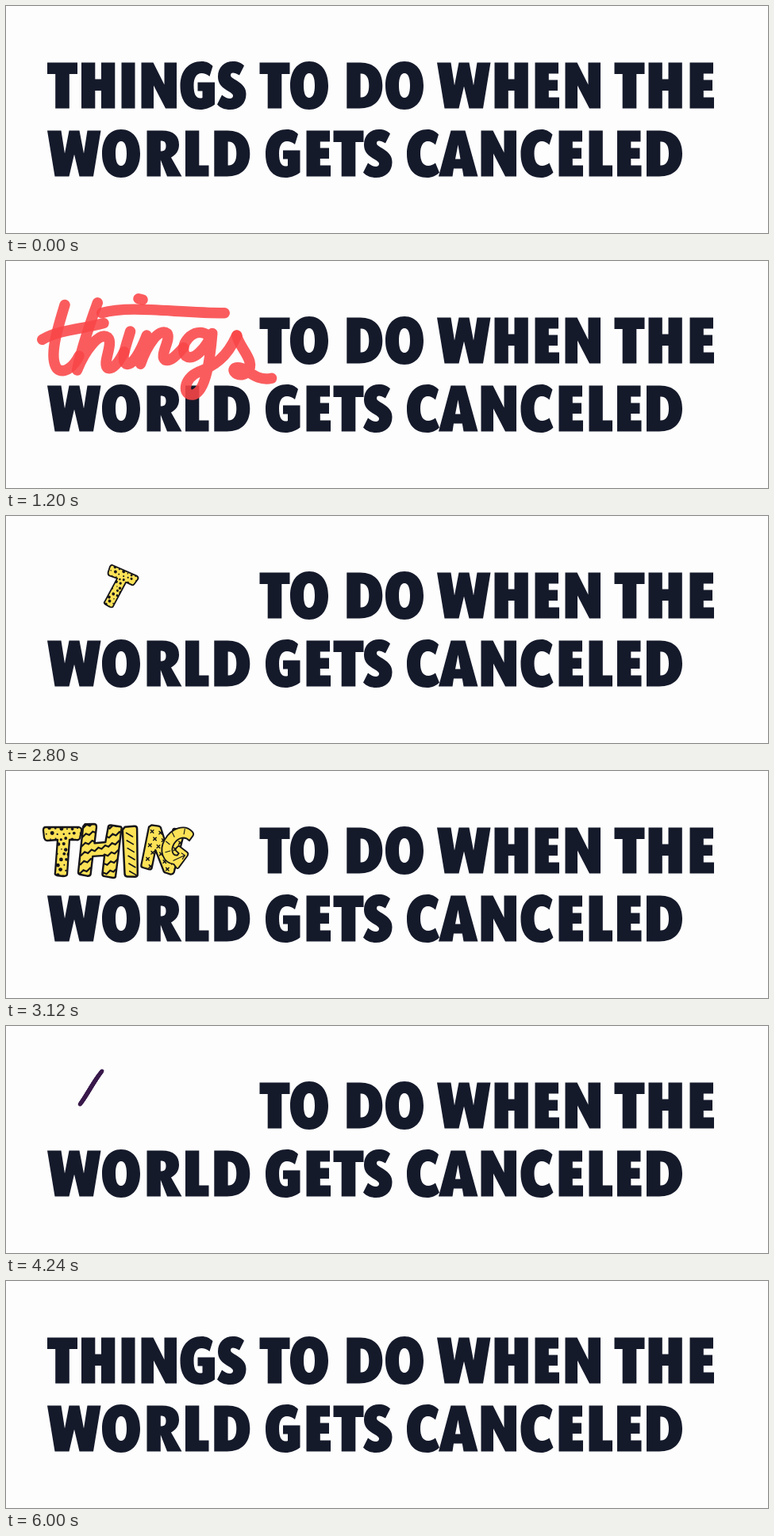
Animation, 960 px wide and 287 px high, one loop 6.8 s. Source, as an HTML page with a canvas:

```html
<!DOCTYPE html>
<html lang="en">
<head>
<meta charset="utf-8">
<title>Things to do when the world gets canceled</title>
<style>
html, body { margin: 0; width: 100%; height: 100%; overflow: hidden; background: #fdfdfd; }
canvas { display: block; width: 960px; height: 287px; }
</style>
</head>
<body>
<canvas id="stage" width="960" height="287" role="img" aria-label="Things to do when the world gets canceled">Things to do when the world gets canceled</canvas>
<script>
const ctx = document.getElementById('stage').getContext('2d');
const LOOP = 6800, STEP = 80;
const INK = '#151a2b', PURPLE = '#3a1a4c', RED = '#fa4648', YELLOW = '#fce256', BLACK = '#15151b';

// Heavy capitals, 58 units tall
const GLYPHS = {
  T: 'M0 0H38V14.5H27.8V58H10.2V14.5H0Z',
  H: 'M0 0H17.3V21H25V0H42.3V58H25V35.5H17.3V58H0Z',
  I: 'M0 0H17V58H0Z',
  N: 'M0 0H15L29 28V0H44.5V58H30.5L15.5 29V58H0Z',
  E: 'M0 0H29.5V14H17.3V22H28.5V35.5H17.3V44H30.5V58H0Z',
  L: 'M0 0H17.3V44H29.5V58H0Z',
  D: 'M0 0H17C35 0 45 11 45 29S35 58 16 58H0ZM17.3 14V44C24.5 44.5 28 39 28 29S24.5 13.5 17.3 14Z',
  O: 'M24 -1.5C39 -1.5 48 11 48 29S39 59.5 24 59.5S0 47 0 29S9 -1.5 24 -1.5ZM24 13.5C19 13.5 17 20 17 29S19 44.5 24 44.5S31 38 31 29S29 13.5 24 13.5Z',
  W: 'M0 0H17.5L22 29L27.5 0H40.5L46 29L50.5 0H67.5L58 58H40.5L34 30L27.5 58H9.5Z',
  R: 'M0 0H19C34 0 40.5 7 40.5 18C40.5 26 36 31 30.5 34L44 58H25.5L17.3 37V58H0ZM17.3 13V26H18C22 26 24 24 24 19.5S22 13 18 13Z',
  G: 'M41 4.5L37 17.5C34 15 30 13.5 27 13.5C20 13.5 17 20 17 29C17 40 20 45 25 45Q27 45 28 44.5V36H22V25H43.5V53C38 57 32 59.5 25 59.5C9 59.5 0 48 0 29.5C0 11 10 -1.5 27 -1.5C33 -1.5 37 .5 41 4.5Z',
  S: 'M34 4L28 16C24.5 14 22 13 20 13C18 13 17 14 17 16C17 18 19 19.5 25 23C33 28 36.5 33 36.5 40C36.5 52 28 59.5 16 59.5C10 59.5 4 57.5 0 53L6 41C10 44 13 45.5 16 45.5C18.5 45.5 20 44 20 42C20 39.5 17 38 12 35C4 30 1 25 1 17.5C1 6 9 -1.5 20 -1.5C26 -1.5 31 .5 34 4Z',
  C: 'M40 5L36 18C33 15 30 13.5 26.5 13.5C20 13.5 17 20 17 29S20 44.5 27 44.5C30 44.5 33 43 36 41L41 53C37 57 32 59.5 25.5 59.5C9 59.5 0 48 0 29.5S10 -1.5 26 -1.5C32 -1.5 36 1 40 5Z',
  A: 'M15.5 0H33.5L49.5 58H31.5L29.8 48H19L17.5 58H0ZM24.5 18L21 36H27.5Z'
};

const ROW1 = 71.5, ROW2 = 157.5;
const WORDS = [
  ['TO', ROW1, [319.5, 358]],
  ['DO', ROW1, [429.3, 478]],
  ['WHEN', ROW1, [543, 615.5, 666.5, 704.5]],
  ['THE', ROW1, [766.5, 809.5, 861.5]],
  ['WORLD', ROW2, [52, 121, 177.5, 226, 262.3]],
  ['GETS', ROW2, [327, 378.5, 412.5, 450]],
  ['CANCELED', ROW2, [505, 545, 598.5, 648.5, 696.5, 734.5, 770, 807]]
];
const FIRST = ['THINGS', ROW1, [52, 95, 145.5, 170.5, 219.5, 266]];
const shapes = {};
for (const k in GLYPHS) shapes[k] = new Path2D(GLYPHS[k]);

function drawWord([text, y, xs]) {
  ctx.fillStyle = INK;
  xs.forEach((x, i) => {
    ctx.save();
    ctx.translate(x, y);
    ctx.fill(shapes[text[i]], 'evenodd');
    ctx.restore();
  });
}

function rng(seed) {
  return () => {
    seed = (seed * 16807) % 2147483647;
    return seed / 2147483647;
  };
}

function sample(d, gap) {
  const p = document.createElementNS('http://www.w3.org/2000/svg', 'path');
  p.setAttribute('d', d);
  const len = p.getTotalLength(), n = Math.max(2, Math.ceil(len / gap)), pts = [];
  for (let i = 0; i <= n; i++) pts.push(p.getPointAtLength(len * i / n));
  return pts;
}

// Stroke a sampled path up to a fraction, with a width per segment
function pen(pts, part, width) {
  const end = Math.floor((pts.length - 1) * Math.min(1, part));
  ctx.lineCap = 'round';
  for (let i = 1; i <= end; i++) {
    const a = pts[i - 1], b = pts[i];
    ctx.lineWidth = width(b.x - a.x, b.y - a.y);
    ctx.beginPath();
    ctx.moveTo(a.x, a.y);
    ctx.lineTo(b.x, b.y);
    ctx.stroke();
  }
}

// Red marker lettering
const MARKER = [
  'M148 84C145 94 140 109 144 115C148 119 153 113 155 109',
  'M137 101C146 96 156 96 167 93',
  'M164 83C160 94 156 106 154 116C158 106 165 97 169 100C172 103 166 113 169 115C172 116 175 111 177 107',
  'M180 97C178 104 175 111 178 113C181 114 185 107 188 99L185 113C188 104 194 95 198 98C200 101 194 109 197 111C200 112 203 108 206 105',
  'M218 99C211 94 203 104 207 109C211 112 217 105 220 98C219 110 217 126 211 128C205 129 206 120 213 117C221 114 227 110 232 99',
  'M232 99C233 105 242 112 237 117C234 120 229 117 231 115C236 113 240 122 249 120',
  'M166 88C180 84 202 88 226 88',
  'M184 81L186 81.5'
].map(d => new Path2D(d));
const MARKER_SCALE = [1, 2.2, 2.79, 2.58, 2.66];

function drawMarker(t) {
  const k = MARKER_SCALE[Math.min(4, Math.floor((t - 960) / STEP))];
  ctx.save();
  ctx.translate(193 - (k - 1) * 1.8, 104.5 + (k - 1) * 2.4);
  ctx.scale(k, k);
  ctx.translate(-193, -104.5);
  ctx.globalAlpha = 0.88;
  ctx.strokeStyle = RED;
  ctx.lineCap = ctx.lineJoin = 'round';
  ctx.lineWidth = 5.2;
  MARKER.forEach(p => ctx.stroke(p));
  ctx.restore();
}

// Rough dry-pen letters, one per step
const ROUGH = [
  ['M40 66C50 62 62 65 76 68C84 69 92 68 96 65', 'M69 68C67 86 69 104 68 119'],
  ['M114 39C111 66 114 94 112 119', 'M113 97C122 84 143 81 144 96C145 104 144 112 144 119'],
  ['M170 87C168 98 170 109 169 119', 'M170 67L172 68'],
  ['M191 87C189 98 191 109 190 119', 'M191 97C200 84 220 81 221 96C222 104 221 112 221 119'],
  ['M264 89C250 82 235 91 235 104C235 121 252 124 264 108', 'M265 87C263 106 268 134 260 146C254 154 243 153 236 146'],
  ['M311 89C301 83 288 86 288 94C289 103 311 103 312 112C311 122 296 121 287 117']
].map(set => set.map(d => sample(d, 1.6)));

function drawRough(t) {
  const count = Math.floor((t - 1840) / STEP) + 1;
  ctx.strokeStyle = PURPLE;
  ROUGH.slice(0, count).forEach((set, i) => set.forEach((pts, j) => {
    const rand = rng(31 + i * 17 + j * 5);
    const rough = pts.map(p => ({ x: p.x + rand() * 1.4 - 0.7, y: p.y + rand() * 1.4 - 0.7 }));
    pen(rough, 1, (dx, dy) => 3.4 + 2 * Math.abs(dy) / (Math.hypot(dx, dy) || 1) + rand() * 1.3);
  }));
}

// Yellow cut-out letters: centre, outline, pattern
const line = (x1, y1, x2, y2) => {
  ctx.moveTo(x1, y1);
  ctx.lineTo(x2, y2);
};

function dots() {
  const rand = rng(77);
  for (let y = 73, row = 0; y < 134; y += 6.5, row++) {
    for (let x = 48 + row % 2 * 3.5; x < 98; x += 7) {
      ctx.beginPath();
      ctx.arc(x + rand() * 2 - 1, y + rand() * 2 - 1, 0.8 + rand() * 1.7, 0, 7);
      ctx.fill();
    }
  }
}

function waves() {
  ctx.lineWidth = 2.1;
  for (let y = 74; y < 160; y += 11) {
    ctx.beginPath();
    for (let x = 97, i = 0; x < 152; x += 4, i++) ctx.lineTo(x, y + (i % 2 ? 1.5 : -1.5) - (x - 97) * 0.4);
    ctx.stroke();
  }
}

function dashes() {
  ctx.lineWidth = 1.5;
  ctx.beginPath();
  for (let y = 80; y < 128; y += 9) line(157, y - 2, 164, y + 3);
  ctx.stroke();
}

function crosses() {
  ctx.lineWidth = 1.5;
  ctx.beginPath();
  for (let y = 81, row = 0; y < 132; y += 9, row++) {
    for (let x = 181 + row % 2 * 5; x < 222; x += 11) {
      line(x - 2, y - 1.6, x + 2, y + 1.6);
      line(x + 1.6, y - 2, x - 1.6, y + 2);
    }
  }
  ctx.stroke();
}

function slants() {
  ctx.lineWidth = 1.4;
  ctx.beginPath();
  line(230, 93, 236, 98);
  line(227, 110, 234, 112);
  line(233, 126, 239, 121);
  line(250, 133, 263, 118);
  line(257, 117, 263, 118);
  line(263, 118, 262, 125);
  line(246, 80, 248, 88);
  ctx.stroke();
}

function rings() {
  ctx.lineWidth = 1.8;
  for (const [x, y, r] of [[291, 96, 6], [291, 96, 13], [291, 96, 20], [274, 130, 8]]) {
    ctx.beginPath();
    ctx.arc(x, y, r, 0, 7);
    ctx.stroke();
  }
}

const CUTOUTS = [
  [71, 101, 'M50 71L92 71Q96 72 95 76L93 85Q92 88 88 87L80 87L77 131Q76 133 72 133L64 132Q61 131 62 128L65 87L52 88Q49 88 48 84L47 75Q47 71 50 71Z', dots],
  [123, 100, 'M103 69L114 68Q117 68 117 72L116 91L129 89L131 71Q131 68 134 68L145 69Q148 69 147 73L144 129Q144 131 141 131L131 130Q128 130 128 127L129 105L115 107L114 128Q114 131 110 131L102 130Q99 130 99 127L101 72Z', waves],
  [160, 100, 'M156 71L167 71Q170 71 170 74L166 127Q166 130 163 130L154 129Q151 129 151 126L153 74Z', dashes],
  [198, 103, 'M179 73L188 73Q191 73 192 76L206 104L207 76Q207 73 210 73L219 74Q222 74 222 77L217 129Q216 132 213 132L207 131Q204 131 203 128L189 104L188 127Q188 130 185 130L177 129Q174 129 174 126L176 76Z', crosses],
  [245, 110, 'M258 79Q263 81 262 85L260 94C251 90 242 96 240 108C239 121 246 126 252 123L253 119L247 117Q245 116 246 113L248 108L264 112Q268 113 267 117L262 140Q261 143 258 141L253 138C236 143 222 128 224 108C226 88 242 72 258 79Z', slants],
  [286, 103, 'M299 75Q301 77 301 79L298 92C292 86 284 86 284 91C285 96 300 98 301 112C302 128 288 138 273 135Q270 134 270 131L271 118C279 124 286 122 286 115C285 108 271 106 271 91C271 76 286 66 299 75Z', rings]
].map(([x, y, d, fill]) => ({ x, y, path: new Path2D(d), fill }));

// Travel from the middle of the word, scale, turn in degrees
const POSES = [[0.43, 0.8, 24], [0.86, 0.98, 9], [1.1, 1.08, -5], [1.07, 1.05, 4], [1, 1, 0]];

function drawCutouts(t) {
  const step = Math.floor((t - 2800) / STEP);
  CUTOUTS.forEach((c, i) => {
    if (step < i) return;
    const [p, k, turn] = POSES[Math.min(4, step - i)];
    ctx.save();
    ctx.translate(192 + (c.x - 192) * p, 83.5 + (c.y - 83.5) * p);
    ctx.rotate(turn * Math.PI / 180);
    ctx.scale(k, k);
    ctx.translate(-c.x, -c.y);
    ctx.fillStyle = YELLOW;
    ctx.fill(c.path);
    ctx.save();
    ctx.clip(c.path);
    ctx.fillStyle = ctx.strokeStyle = BLACK;
    ctx.lineCap = 'round';
    c.fill();
    ctx.restore();
    ctx.strokeStyle = BLACK;
    ctx.lineJoin = 'round';
    ctx.lineWidth = 2.3;
    ctx.stroke(c.path);
    ctx.restore();
  });
}

// Pointed-pen script: path, start, end, thin width, extra on downstrokes
const SCRIPT = [
  ['M121 57C104 78 94 108 71 119C52 129 32 127 33 116C33 110 37 107 41 109', 3960, 4720, 1.4, 5],
  ['M89 72C84 90 70 99 55 97C40 93 46 72 66 62C90 49 115 56 148 53', 4240, 4720, 1.9, 0.8],
  ['M148 53C136 74 121 101 108 124', 4560, 4720, 1.3, 4],
  ['M109 123C117 109 130 90 138 92C144 95 126 113 129 121C132 127 143 119 151 109', 4640, 4800, 1.1, 3.6],
  ['M164 92C159 103 148 117 151 122C155 126 166 118 176 104', 4720, 4880, 1.1, 3.6],
  ['M179 71L180 72', 4800, 4880, 6, 0],
  ['M187 92C184 101 176 114 171 124C181 109 197 90 204 92C210 96 192 115 196 122C200 126 212 117 219 109', 4720, 4960, 1.1, 3.6],
  ['M256 90C247 80 229 96 222 113C219 129 239 122 256 91L237 136C226 156 204 160 203 151C203 139 240 132 267 108', 4866, 5360, 1.3, 3.6],
  ['M264 121C276 115 290 105 299 97C296 106 308 113 300 121C292 127 278 125 282 119', 5360, 5520, 1.1, 3.4],
  ['M300 121C306 120 311 116 315 111', 5440, 5520, 1.1, 0]
].map(([d, from, to, thin, extra]) => ({ pts: sample(d, 0.8), from, to, thin, extra }));

function drawScript(t) {
  ctx.strokeStyle = PURPLE;
  for (const s of SCRIPT) {
    const part = (t - s.from) / (s.to - s.from);
    if (part > 0) {
      pen(s.pts, part, (dx, dy) => s.thin + s.extra * Math.max(0, dy / (Math.hypot(dx, dy) || 1)) ** 1.5);
    }
  }
}

function render(now) {
  const t = Math.floor(now % LOOP / STEP) * STEP;
  ctx.fillStyle = '#fdfdfd';
  ctx.fillRect(0, 0, 960, 287);
  WORDS.forEach(drawWord);
  if (t < 960 || t >= 6000) drawWord(FIRST);
  else if (t < 1840) drawMarker(t);
  else if (t < 2800) drawRough(t);
  else if (t < 4000) drawCutouts(t);
  else drawScript(t);
}

function loop() {
  render(performance.now());
  requestAnimationFrame(loop);
}
loop();
</script>
</body>
</html>
```
